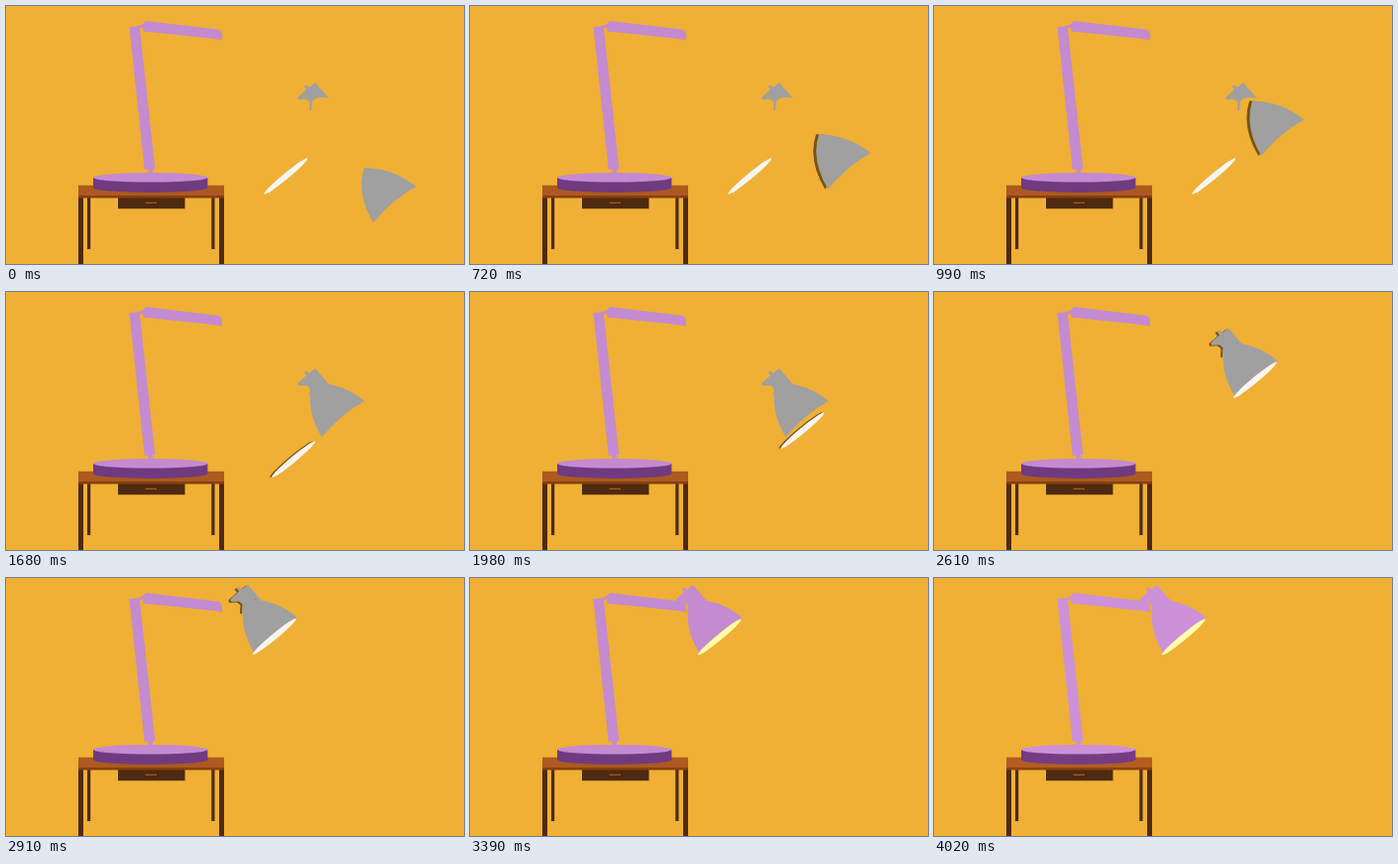
These frames come from a looping animation (462 by 260 pixels, 4.05 s). An HTML page:

```html
<!DOCTYPE html>
<html lang="en">
<head>
<meta charset="utf-8">
<title>Lamp assembly</title>
<style>
  html, body { margin: 0; width: 100%; height: 100%; overflow: hidden; background: #efb035; }
  svg { display: block; width: 100%; height: 100%; }
  .purple { fill: #c48bd0; }
  .wood { fill: #ad591f; }
  .dark { fill: #4e2a10; }
  #shade.lifted { filter: drop-shadow(-3px 0 0 #7a5212); }
  #bulb.lifted { filter: drop-shadow(-2px 0 0 #7a5212); }
  #head.lifted #neck { filter: drop-shadow(-1.5px 1.5px 0 #7a5212); }
</style>
</head>
<body>
<svg viewBox="0 0 462 260">
  <g class="dark">
    <path d="M73 190h5v70h-5zM215 190h5v70h-5zM82 190h3.2v55h-3.2zM207.3 190h3.2v55h-3.2z"/>
    <path d="M113 192h67.5v12.2h-67.5z"/>
  </g>
  <g id="warm">
    <path class="wood" d="M73 180.7h147v11h-147zM140.5 197.7h11.5v1.3h-11.5z"/>
    <path fill="#86400f" d="M73 191h147v2.5h-147z"/>
    <path fill="#6f3a7e" d="M88 173v10a57.7 5 0 0 0 115.4 0v-10z"/>
    <ellipse class="purple" cx="145.7" cy="172.8" rx="57.7" ry="4.8"/>
    <g class="purple">
      <path d="M143.5 162h4.5v9h-4.5z"/>
      <path d="M124.4 21L134.6 20L150.4 164L139.7 165Z"/>
      <path d="M133 20.5L139.5 17L141 15L215 23.7L218 27L218 34.4L210 33.1L138.5 25.6L138 21L134 23Z"/>
    </g>
    <g id="head">
      <g id="metal">
        <path id="neck" d="M300.5 80.7L303 79.5L306 81.7L312 77L325.7 93Q314 90 309 96L308 106L306 105L306.5 97L303 94L295 94.5L294.5 92Q297 89 301 86L303 84Z"/>
        <path id="shade" d="M361.5 163Q391 163.5 413.7 182Q391 194 370.5 218.3Q353 189 361.5 163Z"/>
      </g>
      <g id="bulb"><ellipse cx="282.3" cy="171.5" rx="28.3" ry="3" transform="rotate(-39.6 282.3 171.5)"/></g>
    </g>
  </g>
</svg>
<script>
const LOOP = 4050, STEP = 30, DRAG = 540;
const el = Object.fromEntries(
  ['warm', 'head', 'metal', 'shade', 'bulb'].map(id => [id, document.getElementById(id)]));

// A piece is dragged along a Bezier curve to `drop`, then settles into its seat.
const pieces = {
  shade: { start: 510, bend: [[6, -28], [-34, -63]], drop: [-45, -71], seat: [-52, -72], settle: 150 },
  bulb: { start: 1650, bend: [[48, -17], [60, -40]], drop: [60, -43], seat: [56.5, -42], settle: 60 },
  head: { start: 2400, bend: [[7, -43], [-50, -64]], drop: [-72, -72], seat: [-87, -70], settle: 150 },
};

const progress = (t, from, length) => Math.min(1, Math.max(0, (t - from) / length));
const mix = (a, b, u) => a.map((v, i) => v + (b[i] - v) * u);
const color = rgb => `rgb(${rgb.map(Math.round)})`;

function position({ start, bend: [a, b], drop, seat, settle }, t) {
  const u = progress(t, start, DRAG), v = 1 - u;
  const dragged = drop.map((end, i) => 3 * u * v * (v * a[i] + u * b[i]) + u ** 3 * end);
  return mix(dragged, seat, progress(t, start + DRAG, settle));
}

function draw(t) {
  for (const [id, piece] of Object.entries(pieces)) {
    el[id].setAttribute('transform', `translate(${position(piece, t)})`);
    const held = t > piece.start && t < piece.start + DRAG + piece.settle;
    el[id].classList.toggle('lifted', held);
  }
  const light = progress(t, 3240, 150);
  el.metal.setAttribute('fill', color(mix([160, 160, 160], [196, 139, 208], light)));
  el.bulb.setAttribute('fill', color(mix([248, 245, 240], [255, 251, 168], light)));
  const glow = progress(t, 3720, 300);
  el.warm.style.filter = glow ? `brightness(${1 + 0.04 * glow})` : 'none';
}

const start = performance.now();
function tick() {
  const t = (performance.now() - start) % LOOP;
  draw(Math.floor(t / STEP) * STEP);
  requestAnimationFrame(tick);
}
tick();
</script>
</body>
</html>
```
